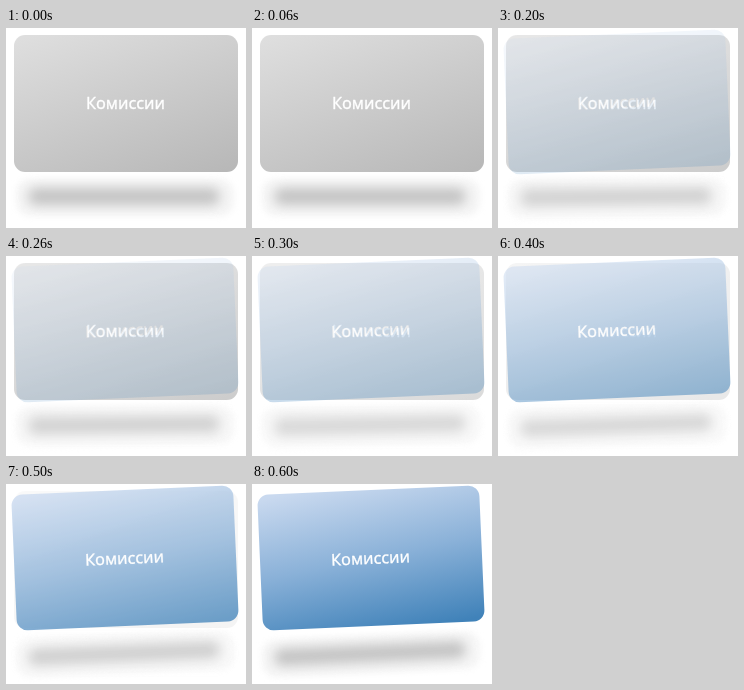
Recreate the animation shown at these times as an HTML page. Size 240 px wide and 200 px high, loop 0.7 s.

```html
<!DOCTYPE html>
<html lang="ru">
<head>
<meta charset="utf-8">
<title>Комиссии</title>
<style>
  html, body {
    margin: 0;
    width: 100%;
    height: 100%;
    overflow: hidden;
    background: #fff;
  }
  .stage {
    position: relative;
    width: 240px;
    height: 200px;
    overflow: hidden;
  }
  .layer {
    position: absolute;
    inset: 0;
    animation: 700ms step-end infinite;
  }
  .idle { animation-name: fade-out; }
  .active {
    opacity: 0;
    animation-name: fade-in;
  }
  .card {
    position: absolute;
    left: 8px;
    top: 7px;
    width: 224px;
    height: 137px;
    border-radius: 11px;
    background: linear-gradient(160deg, #dedede 3%, #b8b8b8 97%);
    font: 16.3px/137px "Noto Sans", "Open Sans", sans-serif;
    color: #fff;
    -webkit-text-stroke: .35px #fff;
    text-align: center;
    text-indent: -1px;
  }
  .shadow, .halo { position: absolute; }
  .shadow {
    left: 22px;
    top: 160px;
    width: 192px;
    height: 17px;
    border-radius: 9px;
    background: #c3c3c3;
    filter: blur(6px);
  }
  .halo {
    left: 10px;
    top: 151px;
    width: 218px;
    height: 37px;
    border-radius: 14px;
    background: #f5f5f5;
    filter: blur(3px);
  }
  .active .card {
    top: 5.5px;
    width: 222px;
    height: 136px;
    background: linear-gradient(171deg, #c9d9ef 3%, #8ab1d8 50%, #4082b9 97%);
    transform: rotate(-2.5deg);
  }
  .active .shadow, .active .halo { transform: translateY(1px) rotate(-2.5deg); }

  /* One pose every seventh of the loop */
  @keyframes fade-out {
    0% { opacity: 1; }
    14.2857% { opacity: .88; }
    28.5714% { opacity: .7; }
    42.8571% { opacity: .5; }
    57.1429% { opacity: .3; }
    71.4286% { opacity: .15; }
    85.7143%, 100% { opacity: 0; }
  }
  @keyframes fade-in {
    0% { opacity: 0; }
    14.2857% { opacity: .09; }
    28.5714% { opacity: .19; }
    42.8571% { opacity: .33; }
    57.1429% { opacity: .52; }
    71.4286% { opacity: .76; }
    85.7143%, 100% { opacity: 1; }
  }
</style>
</head>
<body>
<div class="stage">
  <div class="layer idle">
    <div class="halo"></div>
    <div class="shadow"></div>
    <div class="card">Комиссии</div>
  </div>
  <div class="layer active" aria-hidden="true">
    <div class="halo"></div>
    <div class="shadow"></div>
    <div class="card">Комиссии</div>
  </div>
</div>
</body>
</html>
```
